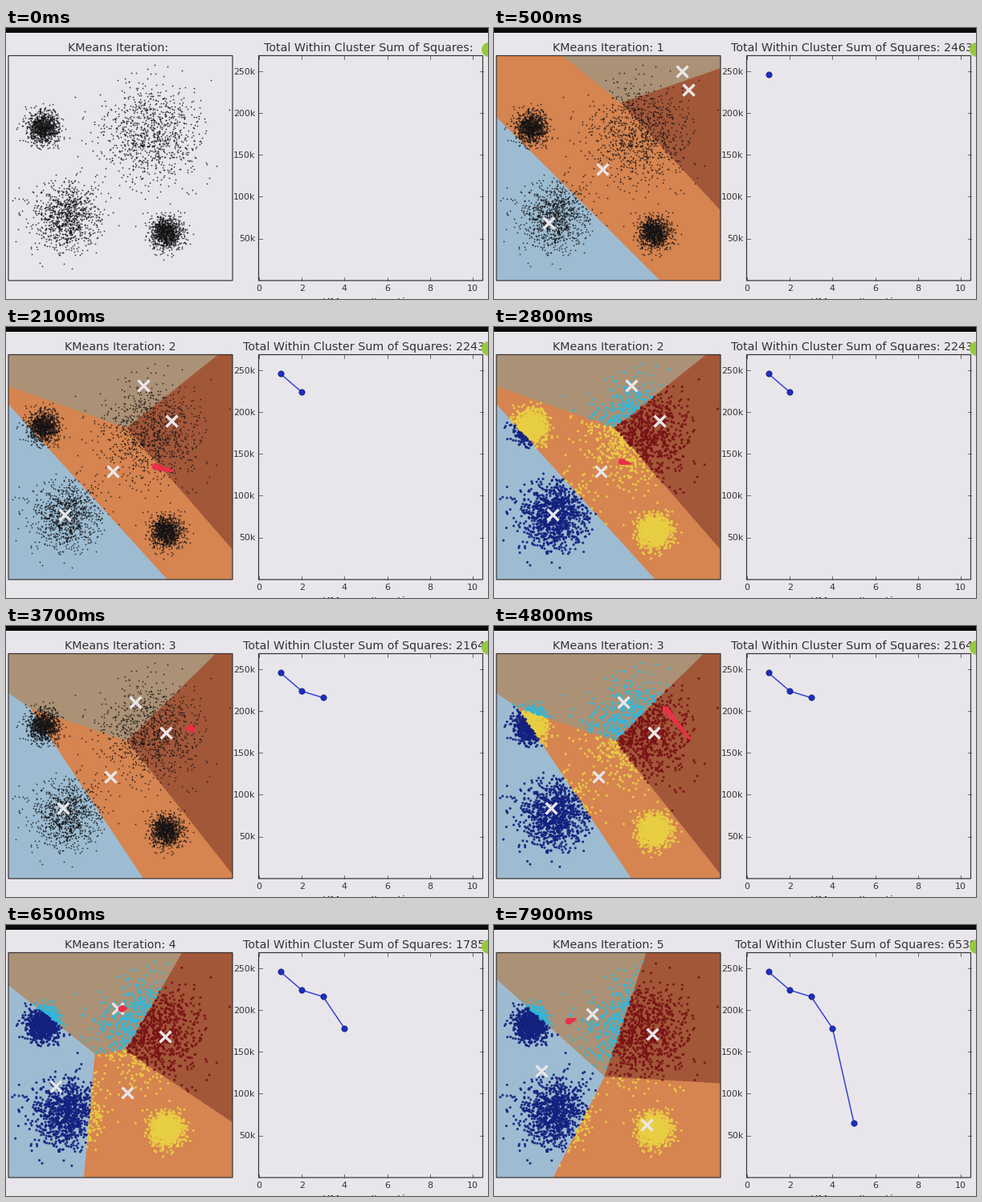
Recreate the animation shown at these times as a matplotlib script. Size 600x338 px, loop 8 s.

```python
import numpy as np
import matplotlib.pyplot as plt
from matplotlib.animation import FuncAnimation
from matplotlib.colors import to_rgb
from matplotlib.patches import Circle, FancyArrowPatch, Rectangle

W, H, DPI = 600, 338, 100
PX = 72 / DPI  # points per pixel
STEP, FRAMES = 100, 80
START, PHASE, ROUNDS = 100, 600, 5  # each round: black, coloured, arrows

BG, INK = "#e9e6eb", "#333333"
REGION = np.array([to_rgb(c) for c in ("#ab9175", "#a33957", "#d68450", "#9dbcd2")])
REGION[1] = to_rgb("#a35739")
DOT = np.array([to_rgb(c) for c in ("#2bb9de", "#7a1216", "#e9cf42", "#14207e")])

SEEDS = [(234, 54), (242, 77), (135, 176), (68, 243)]
BLOBS = [((46, 124), 10), ((180, 132), 31), ((75, 235), 20.5), ((199, 255), 10)]
SCORES = [246351, 224352, 216465, 178502, 65392]

# stops of the laser pointer: time, x, y
STOPS = np.array([(700, 236, 171), (1300, 218, 182), (2800, 159, 168),
                  (3400, 229, 126), (4400, 243, 140), (4800, 214, 104),
                  (6300, 146, 104), (7900, 93, 120)])

BOX_L = (3, 35, 279, 280)
BOX_R = (314.5, 35, 279, 280)


def nearest(xy, centres):
    gap = xy[..., None, :] - centres
    return (gap ** 2).sum(-1).argmin(-1)


def make_points(n=1000):
    rng = np.random.default_rng(4)
    blobs = []
    for mid, spread in BLOBS:
        z = rng.normal(size=(n, 2))
        blobs.append(mid + spread * (z - z.mean(0)) / z.std(0))
    xy = np.vstack(blobs)
    x, y, w, h = BOX_L
    return xy[((xy > (x + 3, y + 3)) & (xy < (x + w - 3, y + h - 3))).all(1)]


def kmeans(xy, centres):
    steps = [np.array(centres, float)]
    for _ in range(ROUNDS):
        group = nearest(xy, steps[-1])
        steps.append(np.array([xy[group == k].mean(0) for k in range(4)]))
    return steps


def region_image(centres):
    x0, y0, w, h = BOX_L
    gx, gy = np.meshgrid(x0 + (np.arange(2 * w) + 0.5) / 2,
                         y0 + (np.arange(2 * h) + 0.5) / 2)
    rgb = REGION[nearest(np.dstack([gx, gy]), centres)]
    return rgb.reshape(h, 2, w, 2, 3).mean((1, 3))


def pointer(ts):
    """Ease from stop to stop."""
    leg = np.interp(ts, STOPS[:, 0], np.arange(len(STOPS)))
    u = leg % 1
    leg = np.floor(leg) + u * u * (3 - 2 * u)
    return np.column_stack([np.interp(leg, np.arange(len(STOPS)), STOPS[:, i])
                            for i in (1, 2)])


def area(diameter):
    return (np.asarray(diameter) * PX) ** 2


def to_px(n, score):
    return 315 + 26.6 * n, 315 - score * 1.042e-3


fig = plt.figure(figsize=(W / DPI, H / DPI), dpi=DPI, facecolor=BG)
ax = fig.add_axes([0, 0, 1, 1])
ax.axis("off")


def label(x, y, text, size, **kw):
    return ax.text(x, y, text, fontsize=size * PX, color=INK,
                   family="DejaVu Sans", **kw)


def frame(box):
    x, y, w, h = box
    ax.add_patch(Rectangle((x, y - 0.5), w, h + 0.5, fill=False, ec=INK,
                           lw=1.2 * PX, zorder=6, snap=False))


def tick(xs, ys):
    ax.plot(xs, ys, color=INK, lw=0.7 * PX, zorder=2)


points = make_points()
centres = kmeans(points, SEEDS)
images = [region_image(c) for c in centres]
colours = [DOT[nearest(points, c)] for c in centres]

x0, y0, w, h = BOX_L
regions = ax.imshow(images[0], extent=(x0, x0 + w, y0 + h, y0),
                    interpolation="nearest", aspect="auto", zorder=1)
ax.set_xlim(0, W)
ax.set_ylim(H, 0)
dots = ax.scatter(*points.T, lw=0, zorder=3)
arrows = [FancyArrowPatch((0, 0), (9, 9), shrinkA=0, shrinkB=0, lw=0,
                          fc="#7f888a", mutation_scale=PX, zorder=4,
                          arrowstyle="simple,head_length=10,head_width=10,tail_width=4")
          for _ in SEEDS]
for a in arrows:
    ax.add_patch(a)
crosses, = ax.plot([], [], "x", color="#e9e6e9", ms=13.5 * PX,
                   mew=3.4 * PX, zorder=5)
trail = ax.scatter([], [], color="#ea3048", lw=0, zorder=7)

frame(BOX_L)
frame(BOX_R)
left, top, w, h = BOX_R
for n in range(0, 11, 2):
    x = to_px(n, 0)[0]
    tick([x, x], [top + h - 4, top + h])
    tick([x, x], [top, top + 4])
    label(x, 328.5, str(n), 11, ha="center")
for k in range(50, 251, 50):
    y = to_px(0, k * 1000)[1] - 0.4
    tick([left, left + 4], [y, y])
    tick([left + w - 4, left + w], [y, y])
    label(310.3, y + 4, f"{k}k", 11, ha="right")
label(454.5, 347, "KMeans Iteration", 14.2, ha="center")

curve, = ax.plot([], [], "-o", color="#3343d2", lw=1.5 * PX, ms=7.3 * PX,
                 mfc="#1c2fc4", mec="#101a60", mew=0.7 * PX, zorder=5)
title_l = label(0, 28.6, "", 14.2, ha="center")
title_r = label(0, 28.6, "", 14.2, ha="center")

ax.add_patch(Rectangle((0, 0), W, 5.7, fc="#0c0a0b", lw=0, zorder=8))
ax.add_patch(Circle((601, 27), 9, fc="#97c93d", lw=0, zorder=8))


def draw_pointer(t):
    ts = np.linspace(t - 400, t, 30)
    live = ts >= STOPS[0, 0]
    trail.set_offsets(pointer(ts[live]))
    trail.set_sizes(area(np.linspace(3, 8, 30)[live]))


def update(i):
    t = i * STEP
    it, rest = divmod(t - START, 3 * PHASE)
    started = it >= 0
    phase = rest // PHASE if started else 0

    regions.set_visible(started)
    if started:
        regions.set_data(images[it])
    dots.set_facecolor(colours[it] if phase else "#141214")
    dots.set_alpha(0.9 if phase else 0.8)
    dots.set_sizes([area(3.1 if phase else 1.8)])

    marks = centres[it] if started else np.empty((0, 2))
    moving = phase == 2
    if moving:
        for a, p, q in zip(arrows, centres[it], centres[it + 1]):
            a.set_positions(tuple(p), tuple(q))
        marks = np.vstack([marks, centres[it + 1]])
    for a in arrows:
        a.set_visible(moving)
    crosses.set_data(marks[:, 0], marks[:, 1])

    n = it + 1
    curve.set_data(*to_px(np.arange(1, n + 1), np.array(SCORES[:n])))
    title_l.set_text("KMeans Iteration:" + (f" {n}" if started else ""))
    title_r.set_text("Total Within Cluster Sum of Squares:"
                     + (f" {SCORES[it]}" if started else ""))
    title_l.set_x(142 if started else 139.5)
    title_r.set_x(454.5 if started else 451)
    draw_pointer(t)
    return []


anim = FuncAnimation(fig, update, frames=FRAMES, interval=STEP,
                     repeat=True, repeat_delay=0, blit=False)
plt.show()
```
